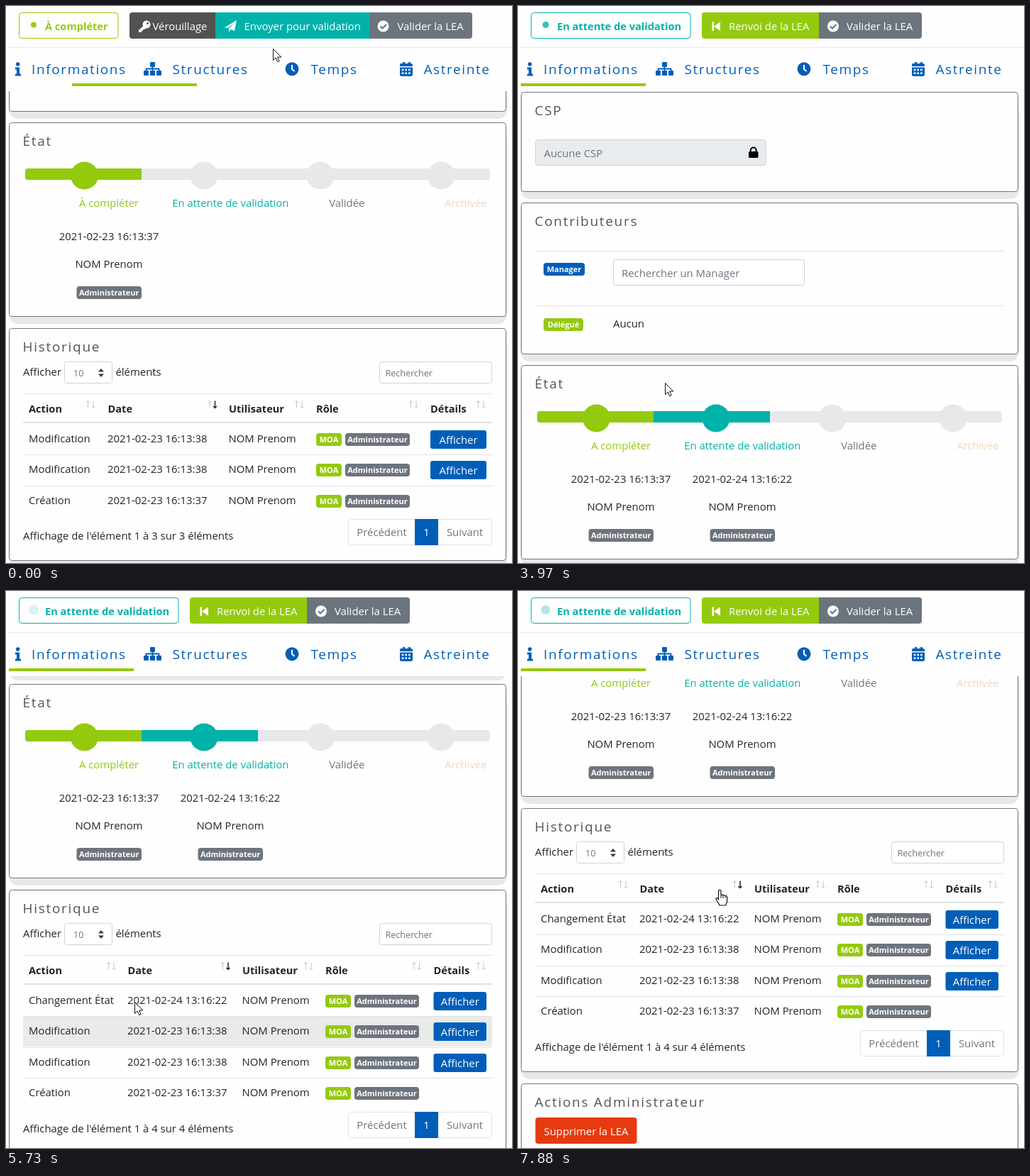
Write an HTML page that moves like this. It is 713 px wide and 785 px high and loops after 8000 ms.

```html
<!DOCTYPE html>
<html lang="fr">
<head>
<meta charset="utf-8">
<style>
  html, body { margin: 0; width: 100%; height: 100%; overflow: hidden; background: #fefefe; }
  svg { display: block; width: 713px; height: 785px; }
  text { font: 14.9px "Open Sans", "Noto Sans", sans-serif; fill: #212529; white-space: pre; }
  .title { font-size: 19px; letter-spacing: 1.7px; fill: #555; }
  .tab { font-size: 19px; letter-spacing: 1.6px; fill: #005eb8; }
  .bold { font-size: 14.6px; font-weight: 700; }
  .badge { font-size: 11px; font-weight: 700; fill: #fff; }
  .small { font-size: 12.6px; fill: #6c757d; }
  .white { fill: #fff; }
  .muted { fill: #6c757d; }
</style>
</head>
<body>
<svg id="stage" viewBox="0 0 713 785"></svg>
<script>
const GREEN = '#94ca0e', TEAL = '#00b2a9', BLUE = '#005eb8', GRAY = '#6c757d',
      PALE = '#e7e8ea', LINE = '#dee2e6', FIELD = '#ced4da';
const STEP = 400 / 3, LOOP = 8000;

const text = (x, y, s, cls = '', extra = '') => `<text x="${x}" y="${y}" class="${cls}" ${extra}>${s}</text>`;
const middle = (x, y, s, cls, fill) =>
  text(x, y, s, cls, `text-anchor="middle"${fill ? ` style="fill:${fill}"` : ''}`);
const box = (x, y, w, h, fill, r = 0, extra = '') =>
  `<rect x="${x}" y="${y}" width="${w}" height="${h}" fill="${fill}" rx="${r}" ${extra}/>`;
const frame = (x, y, w, h, fill, stroke, r = 3) => box(x, y, w, h, fill, r, `stroke="${stroke}"`);
const path = (d, fill = 'none', extra = '') => `<path d="${d}" fill="${fill}" ${extra}/>`;
const circle = (x, y, r, fill) => `<circle cx="${x}" cy="${y}" r="${r}" fill="${fill}"/>`;
const group = (x, y, inner, id = '') => `<g transform="translate(${x} ${y})" id="${id}">${inner}</g>`;
const badge = (x, y, w, s, fill) => box(x, y, w, 18, fill, 4) + middle(x + w / 2, y + 13, s, 'badge');
const card = (y, h, title) =>
  box(4, y + 10, 702, h, PALE, 13) + frame(4.5, y + .5, 700, h - 1, '#fefefe', GRAY, 4) +
  text(23.5, y + 33, title, 'title');

function infoCards() {
  return card(121, 141, 'CSP') +
    frame(24.5, 188.5, 325, 36, '#e9ecef', FIELD, 4) + text(36.5, 213, 'Aucune CSP', 'muted') +
    box(325, 205, 13.5, 9, '#000', 1.5) +
    path('M327.7 206V203.5a4 4 0 0 1 8 0V206', 'none', 'stroke="#000" stroke-width="2"') +
    card(277, 214, 'Contributeurs') +
    box(24, 345, 661, 1, LINE) + box(24, 422, 661, 1, LINE) +
    badge(36, 362, 58, 'Manager', BLUE) + frame(134.5, 357.5, 269, 36, '#fff', FIELD, 2) +
    text(146, 382, 'Rechercher un Manager', 'muted') +
    badge(36, 440, 56, 'Délégué', GREEN) + text(134, 453, 'Aucun');
}

function stateCard(first, steps) {
  const dots = [110.5, 279, 443, 613], fills = [GREEN, TEAL];
  const fillOf = i => i < steps.length ? fills[i] : PALE;
  let s = card(506, 274, 'État') + box(27, 571, 655, 16, PALE, 4) + box(27, 571, 164, 16, GREEN, 4) +
    box(181, 571, 10, 16, GREEN);
  if (steps.length > 1) s += box(191, 571, 164, 16, TEAL);
  dots.forEach((x, i) => s += circle(x, 581, 19.5, fillOf(i)));
  s += middle(145, 625, first, '', GREEN) + middle(316.3, 625, 'En attente de validation', '', TEAL) +
    middle(480.3, 625, 'Validée', 'muted') + middle(647.7, 625, 'Archivée', '', '#eedab8');
  steps.forEach((date, i) => {
    const x = 145 + 171 * i;
    s += middle(x, 672, date) + middle(x, 711, 'NOM Prenom') + badge(x - 45.5, 737, 91.5, 'Administrateur', GRAY);
  });
  return s;
}

const sorter = (x, active) => group(x, 101.5,
  path('M2.5 11V1M0 3.5L2.5 1L5 3.5', 'none', 'stroke="#c3c5c7"') +
  path('M10 1V11M7.5 8.5L10 11L12.5 8.5', 'none', `stroke="${active ? '#212529' : '#c3c5c7'}" stroke-width="${active ? 1.5 : 1}"`));

const rowTop = i => 134 + Math.floor(43.5 * i);

function historyCard(rows, cols, sorts, hoverable) {
  const n = rows.length, end = rowTop(n), right = 677;
  let s = card(0, end + 64, 'Historique') +
    text(24, 67, 'Afficher') + frame(82.5, 47.5, 67, 30, '#fff', FIELD) + text(95, 67.5, '10', 'small') +
    path('M130 61.5L134 57L138 61.5ZM130 64.5L134 69L138 64.5Z', '#343a40') + text(154.5, 67, 'éléments') +
    frame(526.5, 47.5, 158, 30, '#fff', FIELD) + text(534.5, 67.5, 'Rechercher', 'small') +
    box(24, 92, 661, 1, LINE) + box(24, 132, 661, 2, LINE);
  ['Action', 'Date', 'Utilisateur', 'Rôle', 'Détails'].forEach((name, i) =>
    s += text(cols[i], 119, name, 'bold') + sorter(sorts[i], i === 1));
  if (hoverable) s += box(24, 0, 661, 43, '#e9eaea', 0, 'id="hover"');
  rows.forEach(([action, date], i) => {
    const y = rowTop(i);
    if (i) s += box(24, y + 1, 661, 1, LINE);
    s += text(cols[0], y + 26.5, action) + text(cols[1] - .5, y + 26.5, date) + text(cols[2] - .5, y + 26.5, 'NOM Prenom') +
      badge(cols[3], y + 14, 36, 'MOA', GREEN) + badge(cols[3] + 41, y + 14, 91, 'Administrateur', GRAY);
    if (i < n - 1) {
      s += box(cols[4], y + 10, right - cols[4], 26, BLUE, 3) +
        middle((cols[4] + right) / 2, y + 28.5, 'Afficher', 'white');
    }
  });
  return s + text(24, end + 33.5, `Affichage de l'élément 1 à ${n} sur ${n} éléments`) +
    frame(482.5, end + 5.5, 202, 36, '#fff', LINE, 4) + box(576, end + 5, 33, 37, BLUE) +
    middle(529.5, end + 29, 'Précédent', 'muted') + middle(592.5, end + 29, '1', 'white') +
    middle(646.5, end + 29, 'Suivant', 'muted');
}

const created = '2021-02-23 16:13:37', edited = '2021-02-23 16:13:38', sent = '2021-02-24 13:16:22';
const baseRows = [['Modification', edited], ['Modification', edited], ['Création', created]];

const draftPage = infoCards() + stateCard('À compléter', [created]) +
  group(0, 796, historyCard(baseRows, [32, 143.5, 314, 437, 598], [113, 284.5, 407, 568, 663]));
const sentPage = infoCards() + stateCard('A compléter', [created, sent]) +
  group(0, 796, historyCard([['Changement État', sent], ...baseRows],
    [32, 171.5, 333, 450, 602.5], [142, 303, 420, 572.5, 663], true)) +
  card(1184, 120, 'Actions Administrateur') + box(24.5, 1232, 143, 37, '#e83a10', 4) +
  middle(96, 1257, 'Supprimer la LEA', 'white');

const check = x => circle(x, 28.5, 8, '#fff') +
  path(`M${x - 4} 28.5l3 3l5.5 -5.5`, 'none', `stroke="${GRAY}" stroke-width="2.2"`);
const status = (w, s, color) => frame(18.5, 9.5, w, 36, '#fefefe', color, 4) +
  text(55, 34, s, 'bold', `style="fill:${color}"`);

const draftBar = status(139.5, 'À compléter', GREEN) +
  box(174, 9, 130, 37, '#525252', 4) + box(505, 9, 152, 37, GRAY, 4) + box(295, 9, 217, 37, TEAL, 0, 'id="send"') +
  circle(198, 26, 5.5, '#fff') + circle(199.5, 24.5, 1.5, '#525252') +
  path('M195 27L187 34V37H191V35H193V33H195L199 30Z', '#fff') +
  text(206.5, 34, 'Vérouillage', 'white') +
  path('M308 30.5L325 20L322 35L316.5 33L314 37V32L321 24L312 31.5Z', '#fff') +
  text(335.5, 34, 'Envoyer pour validation', 'white') + check(531.5) + text(551.5, 34, 'Valider la LEA', 'white');
const sentBar = status(224.5, 'En attente de validation', TEAL) +
  box(417, 9, 152, 37, GRAY, 4) +
  path('M263 9H424V46H263a4 4 0 0 1 -4 -4V13a4 4 0 0 1 4 -4Z', GREEN, 'id="back"') +
  path('M273.5 22.5H276V35H273.5ZM285 22.5V35L276 28.7Z', '#fff') +
  text(297, 34, 'Renvoi de la LEA', 'white') + check(444) + text(463, 34, 'Valider la LEA', 'white');

const tabs = box(4, 58, 709, 1, '#e6e7e8') +
  text(36, 96, 'Informations', 'tab') + text(234.5, 96, 'Structures', 'tab') +
  text(429.5, 96, 'Temps', 'tab') + text(588.5, 96, 'Astreinte', 'tab') +
  circle(16.7, 82, 2.8, BLUE) + path('M13 86.5H19V95.5H21V98.5H13V95.5H15V89.5H13Z', BLUE) +
  [[203, 79], [194, 91], [203, 91], [212, 91]].map(([x, y]) => box(x, y, 7, 7, BLUE, 1)).join('') +
  path('M206.5 86V91M197.5 91V88.5H215.5V91', 'none', `stroke="${BLUE}" stroke-width="1.8"`) +
  circle(403, 88.7, 9.5, BLUE) + path('M403 83V89L406.5 92', 'none', 'stroke="#fff" stroke-width="2"') +
  path('M557 81H559V79H562V81H567V79H570V81H571a2 2 0 0 1 2 2V85H555V83a2 2 0 0 1 2 -2ZM555 86.5H573V97a2 2 0 0 1 -2 2H557a2 2 0 0 1 -2 -2Z', BLUE) +
  [0, 1, 2, 3, 4, 5].map(i => box(557.7 + 4.7 * (i % 3), 88.7 + 4.7 * (i > 2), 2.6, 2.6, '#fff')).join('') +
  box(0, 109, 176, 4, GREEN, 0, 'id="underline"');

const arrow = path('M.5 .5V16.5L4.2 13L6.7 18.7L9.2 17.6L6.7 12H11.8Z', '#fff', 'id="arrow" stroke="#111"');
const hand = group(0, 0, path('M-1.5 2C-1.5 -.3 2 -.3 2 2V8.5C2 6.5 5 6.7 5 8.7C5 7 8 7.2 8 9.2C8 8 10.7 8.3 10.7 10.5V16C10.7 18 9 19 9 22H0C0 19.5 -4.5 16 -5 13C-5.3 11 -3 11 -1.5 13.5Z',
  '#fff', 'stroke="#111" stroke-width="1.2"') + path('M2 8.5V12M5 9V12M8 9.5V12', 'none', 'stroke="#111"'), 'hand');

document.getElementById('stage').innerHTML =
  `<g id="view"><g id="draftPage">${draftPage}</g><g id="sentPage">${sentPage}</g>` +
  box(0, 0, 713, 120, '#fefefe') + `<g id="draftBar">${draftBar}</g><g id="sentBar">${sentBar}</g>${tabs}` +
  '<circle id="pulse" cx="39" cy="26.5" r="0"/></g>' + group(0, 0, arrow + hand, 'cursor');

const $ = id => document.getElementById(id);
const show = (id, on) => $(id).setAttribute('display', on ? 'inline' : 'none');
const move = (id, x, y) => $(id).setAttribute('transform', `translate(${Math.round(x)} ${Math.round(y)})`);

// Linear interpolation between [time, value] keys.
function at(keys, t, field = 1) {
  const i = keys.findIndex(k => k[0] >= t);
  if (i === 0) return keys[0][field];
  if (i < 0) return keys[keys.length - 1][field];
  const a = keys[i - 1], b = keys[i];
  return a[field] + (b[field] - a[field]) * (t - a[0]) / (b[0] - a[0]);
}

const pointer = [[0, 376, 60], [133, 378, 54], [400, 386, 37], [667, 388, 32], [2267, 388, 32], [2667, 372, 62],
  [2933, 354, 115], [3200, 325, 205], [3733, 217, 480], [4000, 207, 531], [4133, 204, 535], [4267, 181, 579],
  [5867, 181, 579], [6000, 184, 572], [6267, 215, 515], [6667, 310, 335], [6800, 335, 289], [7067, 330, 291],
  [7333, 330, 291], [7600, 312, 345], [7867, 284, 421]];
const scroll = [[4400, 0], [4533, 75], [4667, 172], [4800, 258], [4933, 320], [5067, 365], [5200, 392], [5333, 404],
  [5467, 404], [5733, 375], [5867, 364], [7333, 364], [7467, 388], [7733, 464], [7867, 490]];
const underline = [[0, 93], [133, 60], [267, 34], [400, 16], [533, 7], [667, 4]];
const beat = [[0, .53], [1467, 2.49], [2267, 3.06], [3067, 4.35], [5733, 7.93], [7333, 10.05], [8000, 11.05]];

function render(now) {
  const t = Math.floor((now % LOOP) / STEP + .25) % 60 * STEP + .5;
  const draft = t < 1733;
  const x = at(pointer, t, 1), y = at(pointer, t, 2);
  const onButton = y < 46, onHeader = t > 7800;
  show('view', draft || t > 2133);
  ['draftPage', 'draftBar'].forEach(id => show(id, draft));
  ['sentPage', 'sentBar'].forEach(id => show(id, !draft));
  move('draftPage', 0, -342);
  move('sentPage', 0, -at(scroll, t));
  $('underline').setAttribute('x', at(underline, t));
  $('send').setAttribute('fill', onButton ? '#008c85' : TEAL);
  $('back').setAttribute('fill', onButton ? '#238b36' : GREEN);

  show('hover', t > 5466 && t < 6260);
  $('hover').setAttribute('y', t < 5999 ? 178 : 135);

  const phase = at(beat, t) % 1;
  $('pulse').setAttribute('r', 7.5 * phase);
  $('pulse').setAttribute('opacity', 1 - Math.abs(2 * phase - 1));
  $('pulse').setAttribute('fill', draft ? GREEN : TEAL);

  move('cursor', x, y);
  show('hand', onButton || onHeader);
  show('arrow', !(onButton || onHeader));
}

function tick() {
  render(performance.now());
  requestAnimationFrame(tick);
}
tick();
</script>
</body>
</html>
```
